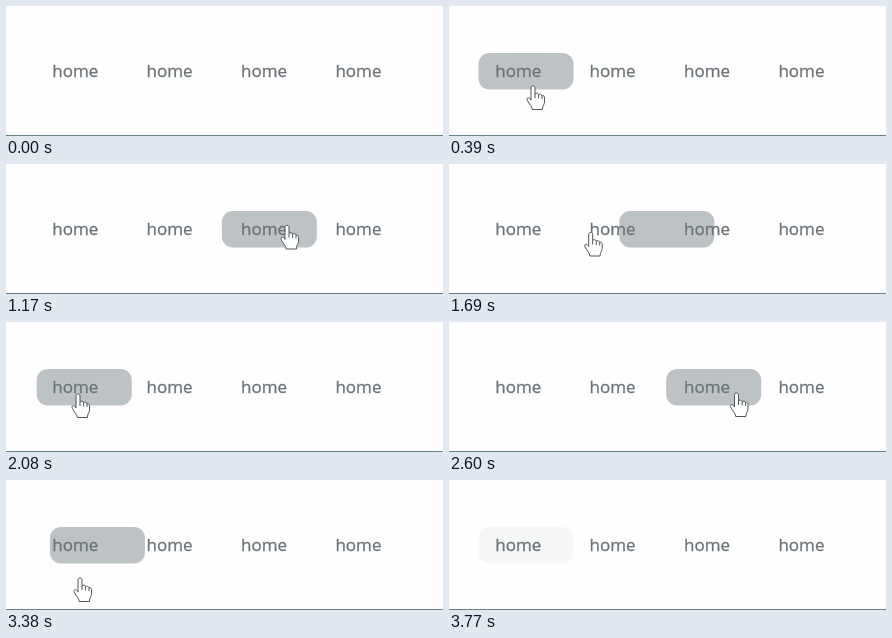
Recreate the animation shown at these times as an HTML page with a canvas. Size 437 by 130 pixels, loop 3.9 s.

```html
<!DOCTYPE html>
<html lang="en">
<head>
<meta charset="utf-8">
<title>Menu hover</title>
<style>
  html, body { margin: 0; width: 100%; height: 100%; overflow: hidden; background: #fefefe; }
  canvas { display: block; }
</style>
</head>
<body>
<canvas id="stage" width="437" height="130"></canvas>
<script>
const ctx = document.getElementById('stage').getContext('2d');
const LOOP = 3900, STEP = 130;
const PILL_X = 29.5, TEXT_X = 46.2, HOVER_X = 12, GAP = 94.4;
const SLIDE = 370, SHOW = 130, LEAVE = 3510, FADE = 3550;

// Where the fingertip turns or rests
const stops = [
  { t: 520, x: 84, y: 80 },
  { t: 780, x: 157, y: 58 },
  { t: 1040, x: 281, y: 61.5 },
  { t: 1430, x: 281, y: 61.5 },
  { t: 1820, x: 72, y: 72 },
  { t: 2080, x: 72, y: 72 },
  { t: 2400, x: 287.5, y: 71 },
  { t: 2600, x: 287.5, y: 71 },
  { t: 2830, x: 374, y: 74 },
  { t: 2990, x: 284.5, y: 74 },
  { t: 3150, x: 74, y: 98 }
];

const hand = new Path2D(
  'M-2 1.8 C-2-.7 2-.7 2 1.8 V8 C3.2 6.6 5.3 7 5.6 8.7 C6.9 7.7 8.7 8.2 9 9.8' +
  ' C10.3 9.2 11.5 10 11.5 11.8 V16 C11.5 18.6 9.4 19.5 9.4 23.5 H-.8' +
  ' C-.8 20.4-3.6 18.6-5.7 14.3 C-6.8 11.8-4.4 10.7-2.9 12.7 L-2 14 Z'
);
const knuckles = new Path2D('M2 8 V12 M5.6 8.7 V12.5 M9 9.8 V13');

const clamp = v => Math.min(1, Math.max(0, v));
const mix = (a, b, k) => a + (b - a) * k;

// CSS "ease": cubic-bezier(.25, .1, .25, 1)
function ease(v) {
  const x = clamp(v);
  let lo = 0, hi = 1;
  for (let i = 0; i < 20; i++) {
    const s = (lo + hi) / 2, r = 1 - s;
    if (.75 * r * r * s + .75 * r * s * s + s * s * s < x) lo = s;
    else hi = s;
  }
  const r = 1 - lo;
  return .3 * r * r * lo + 3 * r * lo * lo + lo * lo * lo;
}

function pointerAt(t) {
  const i = stops.findIndex(s => s.t > t);
  if (i < 1) return i < 0 ? stops[stops.length - 1] : stops[0];
  const a = stops[i - 1], b = stops[i];
  const k = (t - a.t) / (b.t - a.t);
  return { x: mix(a.x, b.x, k), y: mix(a.y, b.y, k) };
}

// Record every time the pointer enters another menu item.
function findMoves() {
  const moves = [];
  let current = 0;
  for (let t = SHOW; t < LEAVE; t += 5) {
    const slot = Math.floor((pointerAt(t).x - HOVER_X) / GAP);
    if (slot !== current) moves.push({ t, slot });
    current = slot;
  }
  return moves;
}
const moves = findMoves();

// Each slide starts from wherever the previous one was interrupted.
function pillX(t) {
  let x = PILL_X;
  moves.forEach((move, i) => {
    if (t < move.t) return;
    const next = moves[i + 1];
    const end = next ? Math.min(t, next.t) : t;
    x = mix(x, PILL_X + move.slot * GAP, ease((end - move.t) / SLIDE));
  });
  return x;
}

function drawPill(t) {
  ctx.globalAlpha = 1 - ease((t - FADE) / SLIDE);
  ctx.fillStyle = '#bdc2c5';
  ctx.beginPath();
  ctx.roundRect(pillX(t), 47, 95, 36.5, 11);
  ctx.fill();
  ctx.globalAlpha = 1;
}

function drawMenu() {
  ctx.fillStyle = ctx.strokeStyle = '#6b7379';
  ctx.lineWidth = .3;
  ctx.font = '17px "Open Sans", "Noto Sans", sans-serif';
  for (let i = 0; i < 4; i++) {
    const x = TEXT_X + i * GAP;
    ctx.fillText('home', x, 71);
    ctx.strokeText('home', x, 71);
  }
}

function drawHand(t) {
  const { x, y } = pointerAt(t);
  ctx.save();
  ctx.translate(x, y);
  ctx.lineWidth = 1;
  ctx.lineJoin = 'round';
  ctx.fillStyle = '#fff';
  ctx.strokeStyle = '#50565a';
  ctx.fill(hand);
  ctx.stroke(hand);
  ctx.stroke(knuckles);
  ctx.restore();
}

function draw(t) {
  ctx.fillStyle = '#fefefe';
  ctx.fillRect(0, 0, 437, 130);
  ctx.fillStyle = '#688088';
  ctx.fillRect(0, 129, 437, 1);
  if (t >= SHOW) drawPill(t);
  drawMenu();
  if (t >= SHOW && t < LEAVE) drawHand(t);
}

const origin = performance.now();
function tick() {
  const t = (performance.now() - origin) % LOOP;
  draw(Math.floor(t / STEP) * STEP);
  requestAnimationFrame(tick);
}
tick();
</script>
</body>
</html>
```
